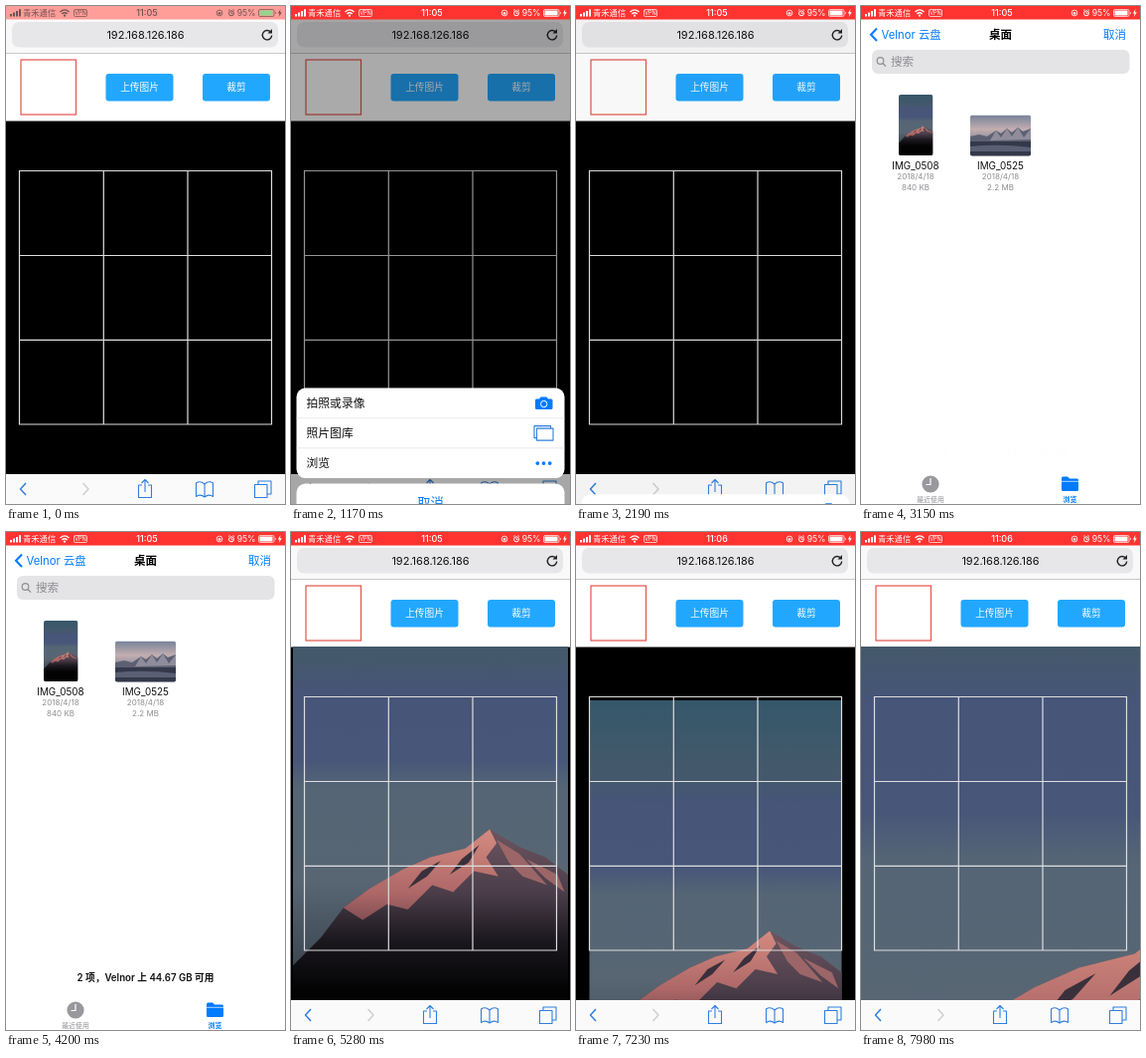
Animation, 281 px wide and 500 px high, one loop 8 s. Source, as an HTML page:

```html
<!DOCTYPE html>
<html lang="zh">
<head>
<meta charset="utf-8">
<style>
html, body { margin: 0; width: 100%; height: 100%; overflow: hidden; background: #fff; }
svg { display: block; width: 281px; height: 500px; }
text { font-family: Inter, "Noto Sans CJK SC", "Noto Sans CJK", sans-serif; }
.mid { text-anchor: middle; }
.end { text-anchor: end; }
.line { fill: none; stroke: #2f7fe0; stroke-width: 1.1; stroke-linejoin: round; }
.blue { fill: #007aff; }
.gray { fill: #8e8e93; }
</style>
</head>
<body>
<svg viewBox="0 0 281 500">
  <defs>
    <linearGradient id="dusk" x2="0" y2="1">
      <stop offset="0" stop-color="#35576a"/>
      <stop offset=".16" stop-color="#44596b"/>
      <stop offset=".23" stop-color="#465578"/>
      <stop offset=".37" stop-color="#475679"/>
      <stop offset=".43" stop-color="#556575"/>
      <stop offset=".62" stop-color="#586673"/>
      <stop offset=".8" stop-color="#3a4550"/>
    </linearGradient>
    <linearGradient id="rock" gradientUnits="userSpaceOnUse" x1="0" y1="144" x2="0" y2="236">
      <stop offset="0" stop-color="#6d5560"/>
      <stop offset=".4" stop-color="#4a3d49"/>
      <stop offset=".7" stop-color="#1a171d"/>
      <stop offset="1" stop-color="#030304"/>
    </linearGradient>
    <linearGradient id="glow" gradientUnits="userSpaceOnUse" x1="0" y1="144" x2="0" y2="205">
      <stop offset="0" stop-color="#d48b80"/>
      <stop offset=".6" stop-color="#ad6767"/>
      <stop offset="1" stop-color="#6a4149"/>
    </linearGradient>
    <linearGradient id="dawn" x2="0" y2="1">
      <stop offset="0" stop-color="#77839a"/>
      <stop offset=".35" stop-color="#c3aeb0"/>
      <stop offset=".6" stop-color="#8d8c9d"/>
    </linearGradient>
    <g id="peak">
      <rect width="158" height="281" fill="url(#dusk)"/>
      <path fill="url(#rock)" d="M0 222L16 206 29 189 44 178 63 167 79 160 99 155 113 144 130 154 145 160 158 170V281H0Z"/>
      <path fill="url(#glow)" d="M29 189L44 178 63 167 79 160 99 155 113 144 117 152 111 160 118 171 104 168 92 180 80 176 66 190 54 187 40 196Z"/>
      <path fill="#9c6668" d="M117 150L130 158 146 176 132 171 124 163ZM134 161L152 170 156 180 145 172Z"/>
      <path fill="#3a303b" d="M107 153L101 163 90 170 97 161ZM85 162L77 171 66 178 74 168Z"/>
    </g>
    <clipPath id="stage"><rect y="115" width="281" height="355"/></clipPath>
    <clipPath id="t1"><rect x="38" y="89" width="34.5" height="61" rx="2"/></clipPath>
    <clipPath id="t2"><rect x="110" y="109.500" width="61" height="41" rx="2"/></clipPath>
  </defs>

  <!-- browser -->
  <rect width="281" height="500" fill="#fff"/>
  <rect width="281" height="47.500" fill="#f9f9f9"/>
  <path d="M0 47.500H281" stroke="#c9c9cb"/>
  <rect x="6" y="16" width="268" height="25.500" rx="7" fill="#e7e7e9"/>
  <text x="140.500" y="33" class="mid" font-size="11" fill="#111">192.168.126.186</text>
  <path d="M266.500 26A4.700 4.700 0 1 0 267.700 29.500" fill="none" stroke="#222" stroke-width="1.400"/>
  <path d="M268 23V27.500H263.500Z" fill="#222"/>
  <rect x="15" y="54" width="55.500" height="55" fill="#fff" stroke="#e5534b" stroke-width="1.200"/>
  <g fill="#22a7ff">
    <rect x="100.500" y="68" width="68" height="27.500" rx="3"/>
    <rect x="198" y="68" width="68" height="27.500" rx="3"/>
  </g>
  <g class="mid" font-size="9.700" fill="#fff">
    <text x="134.500" y="85.300">上传图片</text>
    <text x="232" y="85.300">裁剪</text>
  </g>
  <rect y="115.500" width="281" height="354.500"/>
  <g clip-path="url(#stage)"><use href="#peak" id="photo"/></g>
  <path d="M13.500 165.500H267.500V420H13.500ZM98.300 165.500V420M183 165.500V420M13.500 250.500H267.500M13.500 335.300H267.500" fill="none" stroke="#dedede" stroke-width="1.200"/>
  <rect y="470" width="281" height="30" fill="#fafafa"/>
  <g class="line">
    <path d="M20 479L14.500 485 20 491" stroke-width="1.500"/>
    <path d="M77.500 479L83 485 77.500 491" stroke="#cfcfd2" style="stroke:#cfcfd2" stroke-width="1.500"/>
    <path d="M137 481H133.500V493.500H146.500V481H143M140 488V475.500M136.500 479L140 475.500 143.500 479"/>
    <path d="M200 480Q195.500 476 191.500 479V492.500Q195.500 489.500 200 493Q204.500 489.500 208.500 492.500V479Q204.500 476 200 480V493"/>
    <path d="M250.500 480.500H263V493.500H250.500ZM254 480.500V477H267V490H263"/>
  </g>

  <rect id="dim" width="281" height="500"/>

  <!-- action sheet -->
  <g id="sheet">
    <rect x="5.500" y="360.500" width="270" height="90.500" rx="9" fill="#fff"/>
    <path d="M5.500 390.700H275.500M5.500 420.800H275.500" stroke="#e0e0e2" stroke-width=".7"/>
    <g font-size="11.800" fill="#111">
      <text x="15.500" y="380.300">拍照或录像</text>
      <text x="15.500" y="410.300">照片图库</text>
      <text x="15.500" y="440.300">浏览</text>
    </g>
    <path class="blue" d="M247 371.500H250L251.500 369.500H257.500L259 371.500H262Q263.500 371.500 263.500 373V380.500Q263.500 382 262 382H247.500Q246 382 246 380.500V373Q246 371.500 247 371.500Z"/>
    <circle cx="254.700" cy="376.500" r="3.200" fill="none" stroke="#fff"/>
    <path class="line" d="M247.500 401H264V413H247.500ZM247.500 410.500H245V398.500H261.500V401"/>
    <g class="blue">
      <circle cx="248.300" cy="436" r="1.900"/><circle cx="254.500" cy="436" r="1.900"/><circle cx="260.700" cy="436" r="1.900"/>
    </g>
    <rect x="5.500" y="456.500" width="270" height="39.500" rx="9" fill="#fff"/>
    <text x="140.500" y="481" class="mid blue" font-size="13.300" font-weight="500">取消</text>
  </g>

  <!-- file picker -->
  <g id="picker">
    <rect width="281" height="500" fill="#fff"/>
    <path d="M16 22.500L10 28.700 16 35" fill="none" stroke="#007aff" stroke-width="2"/>
    <text x="20.500" y="33" class="blue" font-size="11.300">Velnor 云盘</text>
    <text x="140.500" y="33" class="mid" font-size="11.500" font-weight="600">桌面</text>
    <text x="267" y="33" class="end blue" font-size="11.500">取消</text>
    <rect x="11" y="44" width="259.500" height="24" rx="6" fill="#e4e4e6"/>
    <circle cx="19.500" cy="55" r="3.300" fill="none" stroke="#8e8e93" stroke-width="1.200"/>
    <path d="M22 57.500L25 60.700" stroke="#8e8e93" stroke-width="1.200"/>
    <text x="30" y="60.200" class="gray" font-size="11.600">搜索</text>
    <g id="files" class="mid">
      <g clip-path="url(#t1)"><use href="#peak" transform="translate(38 89) scale(.2184)"/></g>
      <g clip-path="url(#t2)">
        <rect x="110" y="109.500" width="61" height="41" fill="url(#dawn)"/>
        <path d="M110 131L119 129 127 131 136 125 141 128 147 123 152 127 158 122 163 126 171 123V140H110Z" fill="#5c6072"/>
        <path d="M136 125L141 132 147 123 152 131 158 122 164 132 171 123V134L130 135Z" fill="#8f8d9b"/>
        <path d="M110 136H171V151H110Z" fill="#34394a"/>
        <path d="M110 141Q140 138 171 142V146H110Z" fill="#596073"/>
      </g>
      <g font-size="9.900" fill="#111">
        <text x="55" y="163.500">IMG_0508</text>
        <text x="140.500" y="163.500">IMG_0525</text>
      </g>
      <g class="gray" font-size="8">
        <text x="55" y="174">2018/4/18</text>
        <text x="140.500" y="174">2018/4/18</text>
        <text x="55" y="185">840 KB</text>
        <text x="140.500" y="185">2.2 MB</text>
      </g>
    </g>
    <text id="total" x="140.500" y="450.700" class="mid" font-size="9.700" font-weight="600" fill="#111">2 项，Velnor 上 44.67 GB 可用</text>
    <circle cx="70" cy="480" r="8.600" fill="#98989d"/>
    <path d="M70 474V480.500H65.500" fill="none" stroke="#fff" stroke-width="1.200"/>
    <text x="70" y="497.500" class="mid gray" font-size="6.900">最近使用</text>
    <path class="blue" d="M202 474Q202 472.500 203.500 472.500H208L210 474.500H217.500Q219 474.500 219 476V485.500Q219 487 217.500 487H203.500Q202 487 202 485.500Z"/>
    <path d="M202 477.300H219" stroke="#fff" stroke-width=".7"/>
    <text x="210.500" y="497.500" class="mid blue" font-size="6.900" font-weight="600">浏览</text>
  </g>

  <!-- status bar -->
  <rect id="bar" width="281" height="13.500"/>
  <g id="status" fill="currentColor">
    <path d="M4 8H6V10.500H4ZM7 6.500H9V10.500H7ZM10 5H12V10.500H10ZM13 3.200H15V10.500H13Z"/>
    <text x="17" y="10.200" font-size="8.300">青禾通信</text>
    <g fill="none" stroke="currentColor" stroke-width="1.300">
      <path d="M54.500 6Q59 1.800 63.500 6M56.300 8Q59 5.600 61.700 8"/>
      <rect x="68.500" y="3.500" width="13" height="7" rx="1.200" stroke-width=".7"/>
      <circle cx="215" cy="7" r="2.900" stroke-width=".8"/>
      <circle cx="227" cy="7.300" r="2.500" stroke-width="1"/>
      <path d="M224 4.500L225.500 3.500M230 4.500L228.500 3.500M227 5.800V7.500H228.500" stroke-width=".8"/>
      <rect x="254.500" y="3.500" width="15.500" height="7" rx="1.500" stroke-width=".7"/>
    </g>
    <circle cx="59" cy="9.700" r="1.100"/>
    <rect x="213.700" y="6.300" width="2.600" height="2.200"/>
    <text x="75" y="9.200" class="mid" font-size="5.600">VPN</text>
    <text id="clock" x="142" y="10.300" class="mid" font-size="9" font-weight="500"></text>
    <text x="251.500" y="10.200" class="end" font-size="8.600">95%</text>
    <rect id="charge" x="255.500" y="4.500" width="13" height="5"/>
    <path d="M271 5.700V8.300L272 7ZM276.500 3L273.800 7.500H275.500L274.800 11 277.800 6.200H276Z"/>
  </g>
</svg>
<script>
const LOOP = 8000;
const $ = id => document.getElementById(id);
const linear = p => p;
const easeOut = p => 1 - (1 - p) ** 3;
const easeInOut = p => p < .5 ? 4 * p ** 3 : 1 - (2 - 2 * p) ** 3 / 2;
const smooth = p => p * p * (3 - 2 * p);
const span = (t, from, to, ease = linear) => ease(Math.min(1, Math.max(0, (t - from) / (to - from))));
const mix = (a, b, p) => a + (b - a) * p;
const rgb = (a, b, p) => `rgb(${a.map((v, i) => Math.round(mix(v, b[i], p)))})`;
const slide = (id, y, shown) => {
  $(id).setAttribute("transform", `translate(0 ${y.toFixed(2)})`);
  $(id).style.display = shown ? "" : "none";
};

// time, left, top, width
const moves = [
  [5280, 2, 46, 277],
  [5550, 13.5, 66, 254],
  [5970, 13.5, 66, 254],
  [6300, 61, 152, 158.5],
  [6570, 13.5, 66, 254],
  [6750, 13.5, 66, 254],
  [7230, 13.5, 169, 254],
  [7530, 13.5, 165, 254],
  [7560, 13.5, 165, 254],
  [7980, -2, -11, 443]
];

function placePhoto(t) {
  const photo = $("photo");
  photo.style.display = t < moves[0][0] ? "none" : "";
  let i = 0;
  while (i < moves.length - 2 && t >= moves[i + 1][0]) i++;
  const a = moves[i], b = moves[i + 1];
  const p = span(t, a[0], b[0], smooth);
  const [x, y, w] = [1, 2, 3].map(k => mix(a[k], b[k], p));
  photo.setAttribute("transform", `translate(${x} ${y}) scale(${w / 158})`);
}

function draw(t) {
  const tint = span(t, 60, 300);
  $("bar").setAttribute("fill", rgb([255, 157, 153], [255, 51, 48], tint));
  $("status").style.color = rgb([112, 82, 82], [255, 255, 255], tint);
  $("charge").setAttribute("fill", rgb([150, 212, 140], [255, 255, 255], tint));
  $("clock").textContent = t < 6750 ? "11:05" : "11:06";

  const open = span(t, 900, 1500, easeOut);
  const close = span(t, 1740, 2280, smooth);
  slide("sheet", 140 * (1 - open + close), t > 900 && t < 2280);
  $("dim").setAttribute("opacity", .4 * (open - close));

  const rise = span(t, 2220, 2580, easeOut);
  const fall = span(t, 4380, 4980, easeInOut);
  slide("picker", 500 * (1 - rise + fall), t > 2220 && t < 4980);
  $("files").setAttribute("opacity", span(t, 2520, 2820));
  $("total").setAttribute("opacity", span(t, 3150, 3420));

  placePhoto(t);
}

const start = performance.now();
function tick() {
  draw((performance.now() - start) % LOOP);
  requestAnimationFrame(tick);
}
tick();
</script>
</body>
</html>
```
